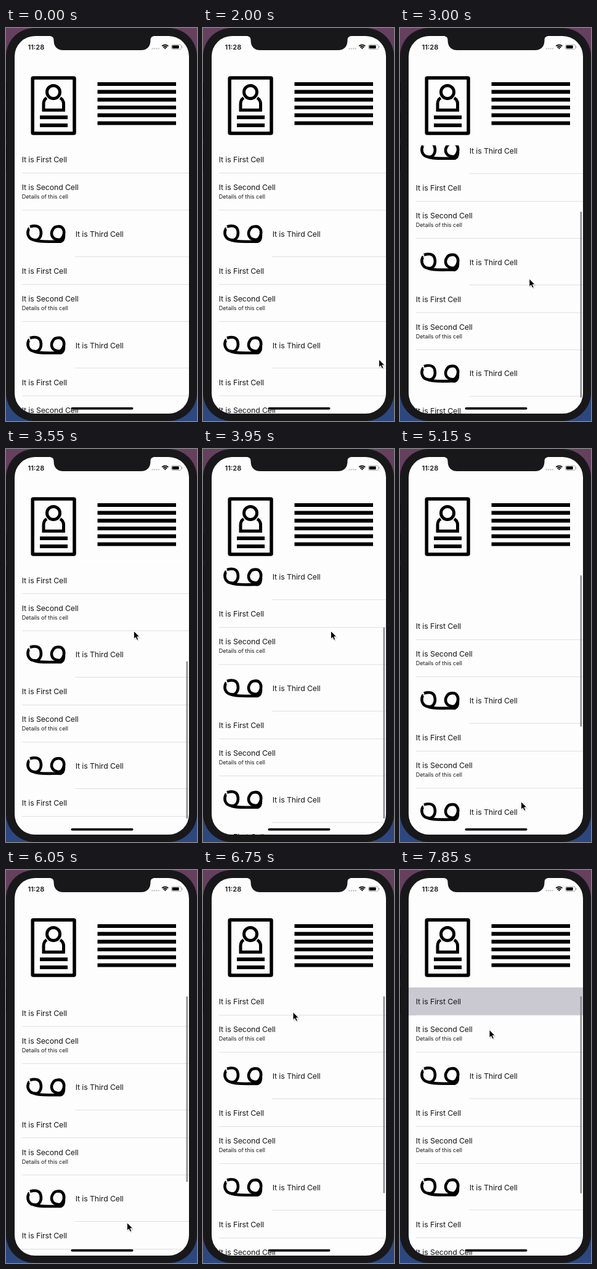
An HTML page for the animation above (8 s loop, 310x638 px).

```html
<!DOCTYPE html>
<html lang="en">
<head>
<meta charset="utf-8">
<title>Scrolling list</title>
<style>
  html, body { margin: 0; width: 100%; height: 100%; overflow: hidden; background: #18181b; }
  svg { display: block; width: 310px; height: 638px; }
  text { font-family: Inter, "Liberation Sans", sans-serif; fill: #161618; }
  .title { font-size: 12.3px; letter-spacing: -.1px; }
  .detail { font-size: 9px; }
  .time { font-size: 11px; font-weight: 600; }
  .line { stroke: #dddde1; stroke-width: 1; }
  .ink { fill: none; stroke: #000; }
</style>
</head>
<body>
<svg viewBox="0 0 310 638">
  <defs>
    <linearGradient id="wall" x2="0" y2="1">
      <stop offset="0" stop-color="#67405f"/>
      <stop offset=".5" stop-color="#3a3050"/>
      <stop offset="1" stop-color="#2d4880"/>
    </linearGradient>
    <clipPath id="screen"><rect x="14" y="13" width="283" height="613" rx="33"/></clipPath>
    <clipPath id="table"><rect x="14" y="190.5" width="283" height="436"/></clipPath>

    <g id="first">
      <text class="title" x="25.7" y="28">It is First Cell</text>
      <path class="line" d="M26 45.3H297"/>
    </g>
    <g id="cells">
      <use href="#first"/>
      <text class="title" x="25.7" y="73">It is Second Cell</text>
      <text class="detail" x="25.7" y="87">Details of this cell</text>
      <path class="line" d="M26 105.5H297"/>
      <g class="ink" stroke-width="4.6" stroke-linecap="round" stroke-linejoin="round">
        <path d="M40 132C47 130 54 131 56 137C59 147 54 155 46 154C37 153 33 144 37 136"/>
        <path d="M84 132C92 131 95 138 94 144C92 152 88 155 82 153C74 151 72 143 76 137C78 133 81 132 84 132"/>
        <path d="M46 154C52 158 76 156 89 156.500C93 155 94 150 94 146"/>
      </g>
      <path d="M38.500 131V137" stroke="#fff" stroke-width="1.300"/>
      <text class="title" x="112.700" y="148.500">It is Third Cell</text>
      <path class="line" d="M112 181H297"/>
    </g>
  </defs>

  <rect width="310" height="638" fill="url(#wall)"/>
  <rect width="310" height="638" rx="46" fill="#18181b"/>
  <path d="M.5 88V115M.5 138V180M.5 190V232" stroke="#08080a"/>

  <g clip-path="url(#screen)">
    <rect x="14" y="13" width="283" height="613" fill="#fefdfe"/>
    <g clip-path="url(#table)">
      <g id="list">
        <rect id="highlight" x="14" y="0" width="283" height="46" fill="#cac9d1"/>
        <use href="#cells"/>
        <use href="#cells" y="180.800"/>
        <use href="#cells" y="361.600"/>
        <use href="#first" y="542.400"/>
      </g>
      <rect id="bar" x="292.500" width="2.600" rx="1.300" fill="#8b8b8e"/>
    </g>

    <g class="ink">
      <rect x="43.200" y="81" width="67.800" height="90" rx="1" stroke-width="5.500"/>
      <circle cx="77" cy="104" r="10.500" stroke-width="5"/>
      <path d="M66 113.500C62 116 61 119 61 123V133.200H93.500V123C93.500 119 92 116 88 113.500" stroke-width="5"/>
      <path d="M55 145H100M55 158H100" stroke-width="6"/>
      <path d="M148.500 91H276M148.500 103.700H276M148.500 116.300H276M148.500 129H276M148.500 141.700H276M148.500 154.500H276" stroke-width="6.200"/>
    </g>

    <path d="M70 12V13C75 13 77.500 15 77.500 20C77.500 30 83 36 93 36H219C229 36 234.500 30 234.500 20C234.500 15 237 13 242 13V12Z" fill="#18181b"/>
    <text class="time" x="35.500" y="34.500">11:28</text>
    <path d="M236.500 33.500H249" stroke="#bbb" stroke-width="2" stroke-dasharray="2 1.400"/>
    <g class="ink" stroke-width="1.700">
      <path d="M253.200 29.300Q258.300 25.300 263.400 29.300M255.200 31.500Q258.300 29 261.400 31.500"/>
      <path d="M256.700 32.700Q258.300 31.500 259.900 32.700L258.300 34.500Z" fill="#000" stroke="none"/>
    </g>
    <rect x="268.500" y="27" width="16" height="7.500" rx="2" fill="none" stroke="#999" stroke-width=".8"/>
    <rect x="269.700" y="28.200" width="11" height="5.100" rx="1" fill="#000"/>
    <path d="M286 29.500V32" stroke="#999"/>
    <rect x="105.500" y="615.700" width="101" height="3.800" rx="1.900" fill="#000"/>
  </g>

  <g id="pointer">
    <path d="M1 2V15L4 12.500L6 16.500L8.500 15.500L6.700 11.700H11Z" fill="#000" opacity=".15"/>
    <path d="M0 0V12.800L2.900 10.200L5 14.800L7.300 13.800L5.300 9.300H9.300Z" fill="#000" stroke="#fff" stroke-width=".9"/>
  </g>
</svg>

<script>
const LOOP = 8000, STEP = 50;
const MAX_SCROLL = 117, TABLE_HEIGHT = 471;
const DRAG_UP = 2450, RELEASE_UP = 3500, RELEASE_DOWN = 5700;
const LOW = 558, HIGH = 295.5, PULLED = 572.5;

const smooth = u => u * u * (3 - 2 * u);
const start = u => u * u * (2 - u);
const stop = u => 1 - (1 - u) ** 3;

// time, x, y, easing towards this point
const pointerPath = [
  [2000, 285.5, 538, smooth],
  [DRAG_UP, 213, LOW, smooth],
  [3450, 207.5, HIGH, smooth],
  [4000, 207.5, HIGH, smooth],
  [4500, 202, 502.5, start],
  [5200, 196.5, PULLED, stop],
  [6100, 196.5, PULLED, smooth],
  [6500, 147, 314, start],
  [6900, 146, 226, stop],
  [7500, 146, 226, smooth],
  [7850, 145, 259.5, smooth]
];

function pointerAt(t) {
  const i = pointerPath.findIndex(key => key[0] > t);
  if (i === 0) return pointerPath[0].slice(1, 3);
  if (i < 0) return pointerPath.at(-1).slice(1, 3);
  const [t0, x0, y0] = pointerPath[i - 1];
  const [t1, x1, y1, ease] = pointerPath[i];
  const k = ease((t - t0) / (t1 - t0));
  return [x0 + (x1 - x0) * k, y0 + (y1 - y0) * k];
}

const resist = d => TABLE_HEIGHT * (1 - 1 / (1 + d * 0.55 / TABLE_HEIGHT));

function rubber(offset) {
  if (offset < 0) return -resist(-offset);
  if (offset > MAX_SCROLL) return MAX_SCROLL + resist(offset - MAX_SCROLL);
  return offset;
}

// Critically damped return after release
function settle(ms) {
  const p = 7.7 * ms / 1000;
  return (1 + p) * Math.exp(-p);
}

function scrollAt(t, y) {
  if (t < DRAG_UP) return 0;
  if (t < RELEASE_UP) return rubber(LOW - y);
  const pull = pos => rubber(MAX_SCROLL - (pos - HIGH));
  if (t < RELEASE_DOWN) {
    const excess = rubber(LOW - HIGH) - MAX_SCROLL;
    return pull(y) + excess * settle(t - RELEASE_UP);
  }
  return pull(PULLED) * settle(t - RELEASE_DOWN);
}

const [list, bar, pointer, highlight] =
  ["list", "bar", "pointer", "highlight"].map(id => document.getElementById(id));
const show = (el, on) => el.setAttribute("visibility", on ? "visible" : "hidden");

function draw(t) {
  const [x, y] = pointerAt(t);
  const offset = scrollAt(t, y);
  const inside = Math.min(MAX_SCROLL, Math.max(0, offset));
  const length = 320 - Math.abs(offset - inside);
  const top = offset > MAX_SCROLL ? 600 - length : 205 + inside / MAX_SCROLL * 75;

  list.setAttribute("transform", `translate(0 ${190.2 - offset})`);
  bar.setAttribute("y", top);
  bar.setAttribute("height", length);
  pointer.setAttribute("transform", `translate(${x} ${y})`);
  show(pointer, t >= 2000);
  show(bar, t > DRAG_UP);
  show(highlight, t >= 7250);
}

const began = performance.now();
function tick() {
  const t = (performance.now() - began) % LOOP;
  draw(Math.floor(t / STEP) * STEP);
  requestAnimationFrame(tick);
}
tick();
</script>
</body>
</html>
```
